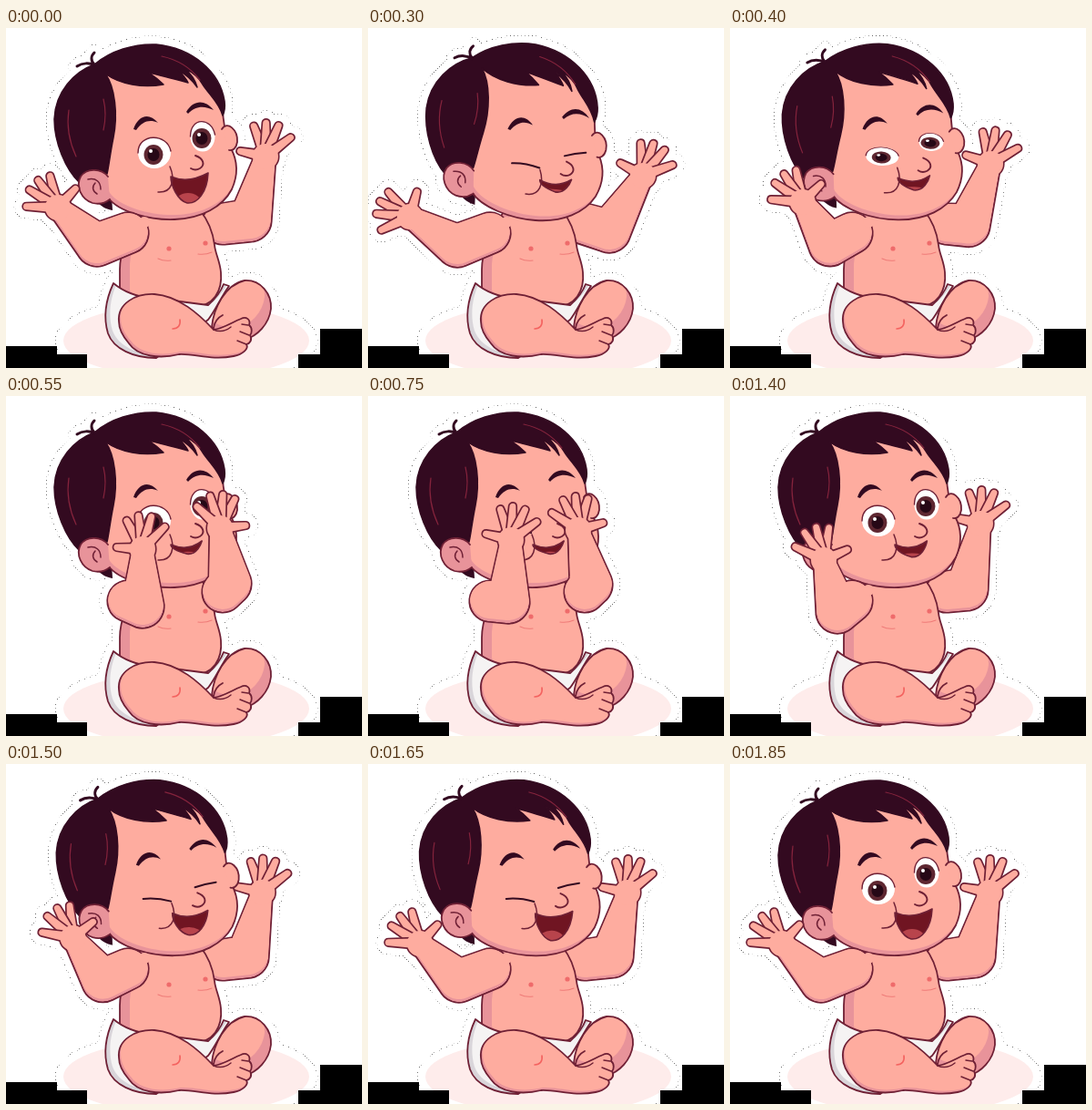
An HTML page with a canvas that plays this animation: 391 by 373 pixels, repeating every 2.25 s.

```html
<!DOCTYPE html>
<html lang="en">
<head>
<meta charset="utf-8">
<title>Peekaboo baby</title>
<style>
html, body { margin: 0; width: 100%; height: 100%; overflow: hidden; background: #fff }
canvas { display: block }
</style>
</head>
<body>
<canvas id="stage" width="391" height="373"></canvas>
<script>
const ctx = document.getElementById('stage').getContext('2d');
const LINE = '#6f2035', SKIN = '#feac9f', SHADE = '#e8939a', HAIR = '#330a20', STREAK = '#84233c';
const P = d => new Path2D(d);
const rad = Math.PI / 180;

// Still shapes
const torso = P('M150 200C140 215 125 240 125 265L125 290C132 300 160 306 205 306C228 306 238 288 236 268C235 256 230 248 229 238C227 222 222 211 213 200Z');
const diaper = P('M118 280C130 290 145 295 160 296L222 304C230 297 236 289 239 281L245 283C236 295 230 310 222 320L165 362C140 362 118 352 112 335C106 315 111 295 118 280Z');
const backLeg = P('M226 328C228 308 240 282 262 277C280 276 292 292 291 308C289 325 276 338 262 342C245 342 232 336 226 328Z');
const frontLeg = P('M124 322C122 302 143 291 163 292C190 294 212 314 228 331C238 330 250 322 258 319C264 316 269 320 267 326C271 329 270 335 268 337C271 342 268 346 264 347C267 352 260 358 250 360C225 365 208 357 190 358C170 363 145 361 135 346C128 338 124 330 124 322Z');
const face = P('M110 55C100 110 96 160 112 186C124 202 158 211 185 210C215 209 238 196 248 177C256 159 253 143 247 132C241 118 238 105 238 85C232 40 200 25 160 22C130 25 112 40 110 55Z');
const hair = P('M109 50C120 65 123 95 118 120C114 140 113 152 111 160C98 152 84 156 81 170C65 155 53 125 53 100C54 70 75 48 97 40C115 25 140 17 165 18C205 22 235 48 240 80C241 88 240 92 238 96C234 82 224 74 216 62C212 54 204 48 196 44C203 50 208 57 210 65C204 56 196 50 189 46C195 52 198 56 200 60C185 56 170 52 157 49C163 53 169 58 173 62C150 66 125 62 109 50Z');
const nape = P('M99 190C105 196 110 199 117 200L116 184Z');
const ear = P('M112 163C104 153 88 154 82 163C76 174 83 188 95 192C103 194 109 192 114 188');
const farEar = P('M237 111C243 101 255 112 254 125C253 132 249 135 245 134');
const cowlick = P('M97 41C92 38 84 38 78 42M97 40C93 36 93 31 97 27');
const shadow = new Path2D();
shadow.ellipse(198, 343, 135, 41, 0, 0, 7);

// left arm, right arm: elbow, palm, hand direction; mood: hand flip, head turn, eyes, mouth
const POSES = {
  open:  [[100, 238, 57, 197, -45], [268, 211, 285, 141, 10], [1, 0, 1, 1]],
  wide:  [[98, 239, 46, 207, -72], [265, 223, 302, 162, 27], [1, 6, 0, .2]],
  half:  [[118, 237, 103, 180, -22], [260, 212, 275, 140, 11], [1, 0, 1, .3]],
  peek:  [[150, 231, 150, 168, 2], [246, 206, 235, 145, -4], [-1, 0, 1, .15]],
  hide:  [[154, 226, 157, 158, 12], [245, 207, 231, 147, -14], [-1, 0, 0, .15]],
  laugh: [[100, 238, 57, 197, -45], [268, 211, 285, 141, 10], [1, 2, 0, 1]]
};
const KEYS = [[0, 'open'], [100, 'open'], [300, 'wide'], [430, 'half'], [550, 'peek'], [750, 'hide'],
  [1200, 'hide'], [1400, 'half'], [1650, 'laugh'], [1850, 'open'], [2250, 'open']];
const SPREAD = [88, 31, 9, -13, -43];

const mixAll = (a, b, u) => a.map((v, i) => v + (b[i] - v) * u);

// Round-ended shape tapering from radius r1 to r2
function taper(x1, y1, r1, x2, y2, r2) {
  const p = new Path2D(), a = Math.atan2(y2 - y1, x2 - x1);
  const d = Math.hypot(x2 - x1, y2 - y1), off = Math.acos(Math.max(-1, Math.min(1, (r1 - r2) / d)));
  p.arc(x1, y1, r1, a + off, a - off + Math.PI * 2);
  p.arc(x2, y2, r2, a - off, a + off);
  p.closePath();
  return p;
}

function limb(sx, sy, [ex, ey, x, y, dir], flip) {
  const arm = taper(sx, sy, 22, ex, ey, 23);
  arm.addPath(taper(ex, ey, 23, x, y, 11));
  const palm = new Path2D();
  palm.arc(x, y, 14, 0, 7);
  const fingers = SPREAD.map(s => {
    const a = (dir + flip * s - 90) * rad, dx = Math.cos(a), dy = Math.sin(a);
    const reach = 28 + 9 * Math.cos(s * rad);
    return taper(x + dx * 8, y + dy * 8, 6, x + dx * reach, y + dy * reach, 4.3);
  });
  return { x, arm, palm, fingers };
}

function fill(p, c) { ctx.fillStyle = c; ctx.fill(p); }
function line(p, c = LINE, w = 1.8) {
  ctx.strokeStyle = c; ctx.lineWidth = w;
  ctx.stroke(typeof p === 'string' ? P(p) : p);
}
function oval(x, y, rx, ry, c) {
  ctx.beginPath(); ctx.ellipse(x, y, rx, ry, 0, 0, 7);
  ctx.fillStyle = c; ctx.fill();
}
// Fill with a shaded rim left uncovered by a shifted copy
function shaded(p, dx, dy, c = SKIN, dark = SHADE) {
  ctx.save();
  ctx.clip(p);
  fill(p, dark);
  ctx.translate(dx, dy);
  fill(p, c);
  ctx.restore();
}

function drawLimb({ arm, palm, fingers }) {
  line(arm, LINE, 3.2);
  line(palm, LINE, 3.2);
  for (const f of fingers) { fill(f, SKIN); line(f, LINE, 1.7); }
  shaded(arm, 0, -3);
  fill(palm, SKIN);
}

function drawBody() {
  shaded(backLeg, -7, -13); line(backLeg);
  line('M238 315C232 318 229 323 228 329');
  shaded(torso, 11, -2); line(torso);
  for (const [x, y] of [[179, 242], [219, 236]]) oval(x, y, 2.6, 2.6, '#ef6b6b');
  line('M167 253Q173 256 181 255M211 248Q219 249 226 246', '#ef7b78', 1.2);
  shaded(diaper, 5, -3, '#f5f3f3', '#d9d5da'); line(diaper);
  shaded(frontLeg, 2, -3); line(frontLeg);
  line('M259 325L266 326M257 333L267 337M254 343L264 347M228 331C235 334 242 332 247 328', LINE, 1.5);
  line('M183 330C189 330 192 326 191 320', '#f4625f', 1.6);
}

function drawEye(x, y, rx, ry, open, slant) {
  ctx.save();
  ctx.translate(x, y);
  if (open < .5) {
    line(`M${-rx * .8} ${11 + slant}Q0 ${9 + slant / 2} ${rx * .9} ${13 - slant}`, HAIR, 2);
  } else {
    ctx.translate(0, 8 * (1 - open));
    ctx.scale(1, open);
    oval(0, 0, rx, ry, '#fff');
    oval(-1, 2, 10.5, 11, '#5e2731');
    oval(-1, 2, 6.5, 7, '#260816');
    oval(-4, -2, 2, 2, '#fff');
    line(`M${-rx} 0C${-rx} ${-ry - 5} ${rx - 4} ${-ry - 5} ${rx} -2`, LINE, 1.4);
  }
  ctx.restore();
}

function drawHead(turn, open, mouth) {
  fill(nape, HAIR);
  shaded(face, 2, -5); line(face);
  fill(farEar, SKIN); line(farEar);
  fill(hair, HAIR); line(hair, HAIR, 1.5);
  line(cowlick, HAIR, 3);
  line('M69 90C66 110 70 126 77 141M107 78Q111 94 107 112M171 31C190 35 203 44 213 57', STREAK, 1.2);
  fill(ear, SHADE); line(ear);
  line('M90 166C99 164 104 169 104 177M98 170C94 174 95 179 100 182', LINE, 1.5);

  // Features slide a little further than the head
  ctx.translate(turn * .7, turn * .4);
  drawEye(163, 137, 18, 17, open, 0);
  drawEye(216, 119, 13.5, 16.5, open, 4);
  fill(P('M140 111C145 96 157 92 167 104C158 100 150 102 143 112Z'), HAIR);
  fill(P('M198 92C206 79 218 78 228 90C218 85 208 85 200 94Z'), HAIR);
  line('M208 140C217 143 219 150 213 154Q208 157 203 154', LINE, 1.9);

  const right = 214 + 8 * mouth, low = 170 + 22 * mouth;
  const lips = P(`M181 163Q200 171 ${right} 159C${right - 1} ${low - 11} 210 ${low + 1} 199 ${low}C188 ${low - 3} 181 ${low - 16 * mouth - 4} 181 163Z`);
  fill(lips, '#701522');
  ctx.save();
  ctx.clip(lips);
  oval(200, low - 1, 14, 10 * mouth, '#b8444c');
  ctx.restore();
  line(lips, LINE, 1.6);
  line('M180 152C186 166 183 181 167 180', LINE, 1.5);
}

// Speckled edge of the white sticker border
const dots = document.createElement('canvas');
dots.width = dots.height = 4;
const dc = dots.getContext('2d');
dc.fillStyle = '#666';
dc.fillRect(0, 0, 1, 1); dc.fillRect(2, 2, 1, 1);
const speckle = ctx.createPattern(dots, 'repeat');

function draw(time) {
  const t = Math.floor(time % 2250 / 50) * 50;
  const i = KEYS.findIndex(k => k[0] > t);
  const [t0, from] = KEYS[i - 1], [t1, to] = KEYS[i];
  const v = (t - t0) / (t1 - t0);
  const u = to === 'half' ? v * v : v * (2 - v);
  const [l, r, [flip, turn, open, mouth]] = POSES[from].map((part, n) => mixAll(part, POSES[to][n], u));
  const left = limb(134, 225, l, flip), right = limb(238, 215, r, -flip);
  const tilt = new DOMMatrix().translate(175, 200).rotate(turn).translate(-175, -200);

  ctx.fillStyle = '#fff';
  ctx.fillRect(0, 0, 391, 373);
  ctx.lineJoin = ctx.lineCap = 'round';

  const outline = new Path2D();
  for (const p of [shadow, torso, diaper, backLeg, frontLeg]) outline.addPath(p);
  for (const a of [left, right]) for (const p of [a.arm, a.palm, ...a.fingers]) outline.addPath(p);
  for (const p of [face, hair, ear, farEar, cowlick]) outline.addPath(p, tilt);
  line(outline, speckle, 19);
  line(outline, '#fff', 16.8);

  fill(shadow, '#feeceb');
  const behind = right.x > 262;
  if (behind) drawLimb(right);
  drawBody();
  ctx.save();
  ctx.transform(tilt.a, tilt.b, tilt.c, tilt.d, tilt.e, tilt.f);
  drawHead(turn, open, mouth);
  ctx.restore();
  drawLimb(left);
  if (left.x < 115) oval(152, 213, 6, 6, SKIN);
  if (!behind) drawLimb(right);

  ctx.fillStyle = '#000';
  for (const [x, y, w] of [[0, 349, 56], [56, 358, 33], [321, 358, 24], [345, 330, 46]]) ctx.fillRect(x, y, w, 373 - y);
}

const start = performance.now();
function tick() {
  draw(performance.now() - start);
  requestAnimationFrame(tick);
}
tick();
</script>
</body>
</html>
```
